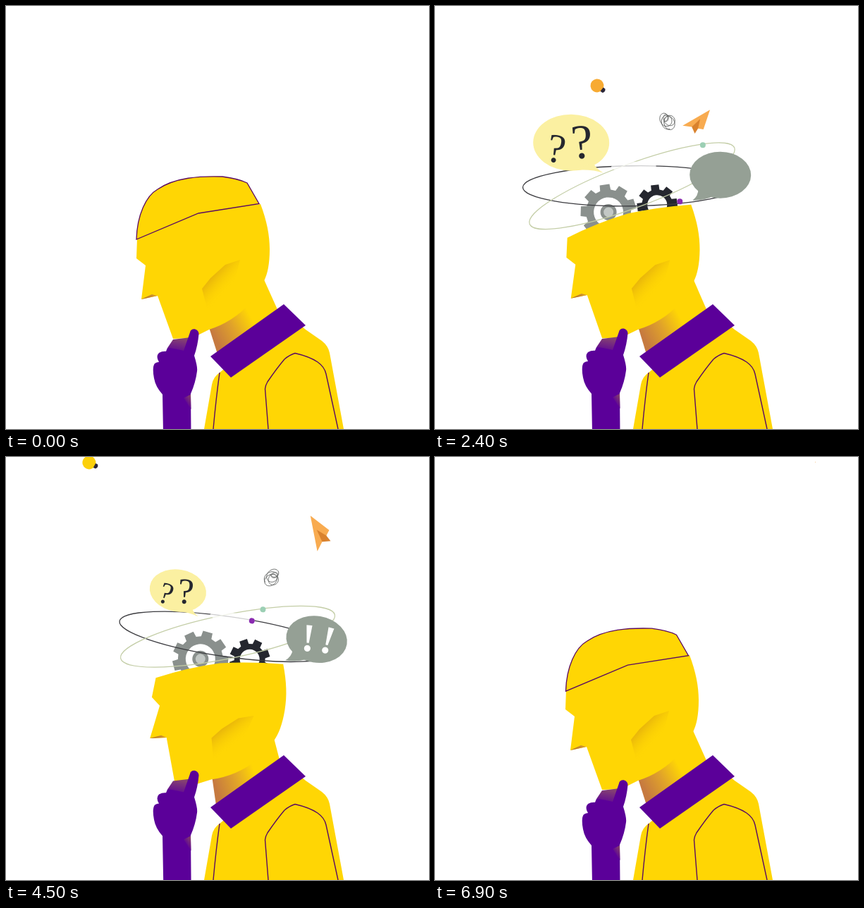
Recreate the animation shown at these times as an HTML page with a canvas. Size 600x600 px, loop 7000 ms.

```html
<!DOCTYPE html>
<html lang="en">
<head>
<meta charset="utf-8">
<title>Thinking head</title>
<style>
html, body { margin: 0; width: 100%; height: 100%; overflow: hidden; background: #fff; }
canvas { display: block; width: 100vw; height: 100vh; }
</style>
</head>
<body>
<canvas id="stage" width="600" height="600"></canvas>
<script>
const ctx = document.getElementById('stage').getContext('2d');
const LOOP = 7000, RAD = Math.PI / 180;
const YELLOW = '#ffd604', PURPLE = '#5b0099', LINE = '#5a0b62', DARK = '#25272f', GREY = '#8a908d';
const PIVOT = [300, 481];

// Easing
const clamp = u => Math.min(1, Math.max(0, u));
const span = (t, a, b) => clamp((t - a) / (b - a));
const sine = u => (1 - Math.cos(Math.PI * u)) / 2;
const cubic = u => u < .5 ? 4 * u ** 3 : 1 - 4 * (1 - u) ** 3;
const backOut = u => 1 + 2 * (u - 1) ** 3 + (u - 1) ** 2;
// Rises over a..b and falls over c..d
const inOut = (t, a, b, c, d) => t < c ? backOut(span(t, a, b)) : 1 - sine(span(t, c, d));

// Smooth curve through rows of [time, ...values]
function track(rows, t) {
  const last = rows.length - 1;
  if (t <= rows[0][0]) return rows[0].slice(1);
  if (t >= rows[last][0]) return rows[last].slice(1);
  let i = 0;
  while (t >= rows[i + 1][0]) i++;
  const p = rows[i], q = rows[i + 1], h = q[0] - p[0], u = (t - p[0]) / h;
  const slope = (n, k) => {
    const a = rows[Math.max(0, n - 1)], b = rows[Math.min(last, n + 1)];
    return (b[k] - a[k]) / (b[0] - a[0]);
  };
  return p.slice(1).map((v, j) => {
    const k = j + 1, d = q[k] - v, m = slope(i, k) * h, n = slope(i + 1, k) * h;
    return v + u * m + u * u * (3 * d - 2 * m - n) + u ** 3 * (m + n - 2 * d);
  });
}

const planeKeys = [ // time, x, y, heading, scale
  [250, 322, 290, -90, .1], [800, 331, 219, -86, .64], [1600, 342, 190, -74, .75],
  [2400, 372, 161, -42, .87], [3200, 426, 119, 26, .97], [3700, 462, 124, 75, 1],
  [4050, 473, 136, 140, 1], [4270, 456, 133, 205, 1], [4500, 440, 108, 247, 1],
  [5000, 455, 76, 285, 1], [5900, 502, 48, 318, 1], [6400, 527, 22, 322, .5], [6900, 539.5, 7, 325, .03]
];
const bulbKeys = [ // time, x, y, base angle, scale
  [700, 279, 252, 90, 0], [1600, 246, 150, 60, .8], [2400, 230, 113, 38, 1],
  [3200, 220, 59, 112, 1], [4000, 157, 29, 70, 1], [4500, 118, 8, 28, 1], [4900, 96, -14, 10, 1]
];
const violetKeys = [[300, 140], [800, 206], [2400, 415], [3200, 524.5], [4500, 645], [5600, 760]];

// Drawing helpers
function group(x, y, angle, scale, draw) {
  if (scale <= .002) return;
  ctx.save();
  ctx.translate(x, y);
  ctx.rotate(angle * RAD);
  ctx.scale(scale, scale);
  draw();
  ctx.restore();
}
function scaledAt(x, y, scale, draw) {
  group(x, y, 0, scale, () => { ctx.translate(-x, -y); draw(); });
}
function fill(path, style) {
  ctx.fillStyle = style;
  ctx.fill(new Path2D(path));
}
function stroke(path, style, width) {
  ctx.strokeStyle = style;
  ctx.lineWidth = width;
  ctx.stroke(new Path2D(path));
}
function ellipse(x, y, rx, ry, angle = 0) {
  ctx.beginPath();
  ctx.ellipse(x, y, rx, ry, angle * RAD, 0, 2 * Math.PI);
}
function disc(x, y, r, style) {
  ellipse(x, y, r, r);
  ctx.fillStyle = style;
  ctx.fill();
}
function fade(x0, y0, x1, y1, ...stops) {
  const g = ctx.createLinearGradient(x0, y0, x1, y1);
  stops.forEach((c, i) => g.addColorStop(i / (stops.length - 1), c));
  return g;
}
function glyph(char, x, y, size, angle, style, alpha, weight = '') {
  group(x, y, angle, 1, () => {
    ctx.globalAlpha = alpha;
    ctx.font = `${weight} ${size}px "Liberation Serif", serif`;
    ctx.textAlign = 'center';
    ctx.fillStyle = style;
    ctx.fillText(char, 0, size * .33);
  });
}

function gear(x, y, angle, teeth, outer, root, hole, style) {
  const step = 360 / teeth;
  group(x, y, angle, 1, () => {
    ctx.beginPath();
    for (let i = 0; i < teeth; i++) {
      [[-.34, root], [-.25, outer], [.25, outer], [.34, root]].forEach(([a, r]) => {
        const b = (i + a) * step * RAD;
        ctx.lineTo(r * Math.cos(b), r * Math.sin(b));
      });
    }
    ctx.closePath();
    ctx.moveTo(hole, 0);
    ctx.arc(0, 0, hole, 0, 2 * Math.PI);
    ctx.fillStyle = style;
    ctx.fill('evenodd');
  });
}

function drawGears(t) {
  const drop = 60 * (1 - sine(span(t, 100, 700)) + cubic(span(t, 5650, 6350)));
  const turn = (t - 800) * .007;
  gear(244, 293 + drop, -110 + turn, 9, 40, 32, 21, GREY);
  disc(244, 293 + drop, 11.5, GREY);
  disc(244, 293 + drop, 7, '#c3c8c5');
  gear(313, 282 + drop * .8, -82 - turn * 1.4, 8, 29, 22, 14, DARK);
}

function dotOn(rx, ry, tilt, angle, style) {
  const a = angle * RAD, x = rx * Math.cos(a), y = ry * Math.sin(a), c = Math.cos(tilt * RAD), s = Math.sin(tilt * RAD);
  disc(277 + x * c - y * s, 255.5 + x * s + y * c, 4, style);
}

function drawOrbits(t) {
  const ring = (scale, rx, ry, tilt, style, width) => scaledAt(277, 319, scale, () => {
    ellipse(277, 255.5, rx, ry, tilt);
    ctx.strokeStyle = style;
    ctx.lineWidth = width;
    ctx.stroke();
  });
  const dark = inOut(t, 150, 750, 5600, 6290), pale = inOut(t, 150, 750, 5150, 5700);
  ring(dark, 155, 28.5, -1.4, '#3c3c40', 1.3);
  ring(pale, 155, 31, -21, '#c3cda6', 1.2);
  scaledAt(277, 319, dark, () => {
    ellipse(279, 228, 32, 7, -2);
    ctx.fillStyle = 'rgba(255,255,255,.75)';
    ctx.fill();
  });
  scaledAt(277, 319, pale, () => {
    dotOn(118, 28, -1.4, track(violetKeys, t)[0], '#8a2bb0');
    dotOn(150, 30, -21, 255 - (t - 800) * .1845, '#9ccfb4');
  });
}

function drawBubbles(t) {
  scaledAt(216, 226, inOut(t, 1100, 1600, 4300, 4900), () => {
    ellipse(190, 195, 54, 40);
    ctx.fillStyle = '#fbf0a1';
    ctx.fill();
    fill('M196 234 Q220 232 236 237.5 Q224 230 221 222 Z', '#fbf0a1');
    glyph('?', 169, 204, 58, 9, DARK, span(t, 1700, 1900));
    glyph('?', 205, 194, 69, -5, DARK, span(t, 1950, 2150));
  });
  scaledAt(364, 275, inOut(t, 1500, 2000, 4520, 5100), () => {
    ellipse(402, 238.5, 43.5, 33);
    ctx.fillStyle = '#95a095';
    ctx.fill();
    fill('M371 259 Q371 269 363 275 Q380 275 392 269 Z', '#95a095');
    glyph('!', 390, 238.5, 56, -4, '#fff', span(t, 2700, 3000), 'bold');
    glyph('!', 418, 237, 56, 6, '#fff', span(t, 2950, 3450), 'bold');
  });
}

function drawScribble(t) {
  group(326, 162, t * .03, inOut(t, 1650, 2150, 4900, 5300), () => {
    ctx.beginPath();
    for (let i = 0; i <= 160; i++) {
      const a = i * .2, r = 7.5 + 3 * Math.sin(a * .37);
      ctx.lineTo(r * Math.cos(a) + 5 * Math.cos(a * .31), r * .85 * Math.sin(a) + 3 * Math.sin(a * .23));
    }
    ctx.strokeStyle = '#5d605f';
    ctx.lineWidth = .8;
    ctx.stroke();
  });
}

function drawBulb(t) {
  if (t > 4900) return;
  const [x, y, angle, scale] = track(bulbKeys, t);
  const warm = 1 - span(t, 2400, 3000);
  group(x, y, angle, scale, () => {
    fill('M3 -6 L9 -3.5 V3.5 L3 6 Z', YELLOW);
    disc(0, 0, 9.5, `rgb(${252 - 5 * warm},${208 - 38 * warm},${10 + 40 * warm})`);
    fill('M8.5 -3.4 H12 Q15 0 12 3.4 H8.5 Z', '#2b2638');
  });
}

function drawPlane(t) {
  if (t < 250) return;
  const [x, y, heading, scale] = track(planeKeys, t);
  group(x, y, heading, scale, () => {
    fill('M26 2 L-24.5 -8.6 L-14.7 3 L-9 11.8 L-3.3 18.6 Z', '#f8ab50');
    fill('M4 2.5 L-14.7 3 L-18.4 14.4 L-9 11.8 Z', '#d9822e');
  });
}

function drawHead() {
  fill('M288 456 L302 500 L330 505 L392 446 L365 386 L330 400 Z', fade(298, 474, 350, 446, '#c67a40', '#e0a22a', YELLOW));
  fill('M186 330 Q228 308 272 294.5 Q315 285 361 281 C370 305 374 325 374 345 C374 366 371 380 366 390 ' +
    'Q360 414 346 422 Q322 448 288 459 L264 471 L237 472 L215 411 L192 416 L198 368 L185 358 Z', YELLOW);
  fill('M192 416 L207 409 L215 411 Z', fade(192, 414, 215, 410, '#a5622f', '#e0a52a'));
  fill('M278 401 L290 386 L311 367 L332 360 L322 400 L288 440 Z', fade(284, 388, 308, 410, '#e3ae0c', 'rgba(255,214,4,0)'));
}

function drawCap(t) {
  const lift = t < 3500 ? sine(span(t, 0, 700)) : 1 - 1.0075 * sine(span(t, 5570, 6350));
  const alpha = t < 3500 ? 1 - span(t, 520, 700) : span(t, 5580, 5720);
  if (!alpha) return;
  group(-64 * lift, -163 * lift, 0, 1, () => {
    const cap = 'M185 331 C186 296 199 269 215 260 C240 243 275 241 307 242 Q330 245 342 251 L359 280.5 L273 294 Z';
    ctx.globalAlpha = alpha;
    fill(cap, YELLOW);
    stroke(cap, LINE, 1.3);
  });
}

function drawBody() {
  fill('M281 600 L292 537 Q294 526 303 520 L330 498 L402 440 L425 459 L448 475 Q457 482 459 492 L479 600 Z', YELLOW);
  stroke('M303 520 Q298 556 294 600', LINE, 1.4);
  stroke('M372 600 L367.5 543 Q368 538 371 533 Q384 514 395 501 Q402 495 410 492.5 Q430 497 442 505 Q452 512 454 522 L471 600', LINE, 1.4);
  fill('M394 423 L425 453 L319 527 L290 497 Z', PURPLE);
}

function drawHand() {
  fill('M237 473 L262 470 L258 496 L226 492 L229 485 Z', fade(244, 470, 240, 493, '#87466f', PURPLE));
  fill('M261 463 C262 456 273 457 273.5 465 Q272 482 267 496 Q272 512 271 518 Q269 534 262 550 L263 660 H224 L222 551 ' +
    'Q212 540 210 528 Q207 512 211 507 Q214 505 217 505 Q212 497 217 492 Q222 489 229 490 Q227 485 232 485 Q244 487 252 489 Z', PURPLE);
  fill('M262 551 L262.5 572 L252 556 Z', fade(263, 556, 254, 562, '#86406a', PURPLE));
}

function render(t) {
  ctx.clearRect(0, 0, 600, 600);
  const tilt = 9.5 * (sine(span(t, 2150, 3650)) - sine(span(t, 4700, 5700)));
  const inHead = draw => group(...PIVOT, tilt, 1, () => { ctx.translate(-PIVOT[0], -PIVOT[1]); draw(); });
  inHead(() => { drawGears(t); drawOrbits(t); });
  drawBulb(t);
  drawPlane(t);
  inHead(() => {
    drawScribble(t);
    drawBubbles(t);
    drawHead();
    drawCap(t);
  });
  drawBody();
  group(0, -1.42 * tilt, 0, 1, drawHand);
}

const start = performance.now();
function tick() {
  render((performance.now() - start) % LOOP);
  requestAnimationFrame(tick);
}
tick();
</script>
</body>
</html>
```
